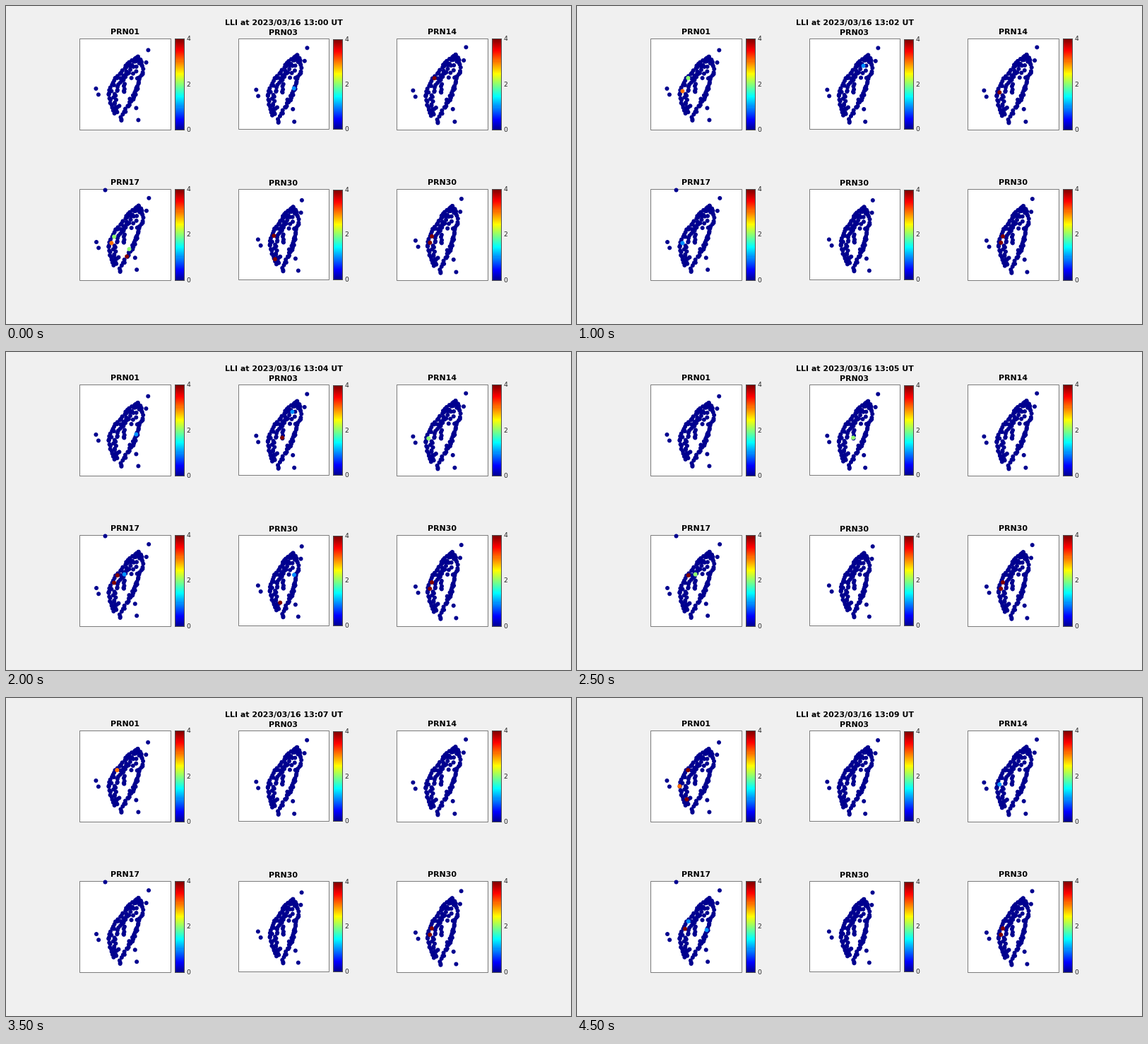
These frames come from a looping animation (800 by 450 pixels, 5000 ms). A matplotlib script:

```python
import numpy as np
import matplotlib.pyplot as plt
from matplotlib.animation import FuncAnimation
from matplotlib.colors import ListedColormap
from matplotlib.patches import Rectangle

W, H, DPI = 800, 450, 100
FRAMES, INTERVAL = 10, 500
PX = 72 / DPI
DOT = dict(s=(6 * PX) ** 2, linewidths=0, zorder=5, clip_on=False)
rng = np.random.default_rng(8)


def strand(keys, n, spread):
    """Stations spaced evenly along a polyline, scattered a little."""
    keys = np.array(keys, float)
    run = np.r_[0, np.cumsum(np.hypot(*np.diff(keys, axis=0).T))]
    t = np.linspace(0, run[-1], n)
    path = np.column_stack([np.interp(t, run, axis) for axis in keys.T])
    return path + rng.uniform(-spread, spread, path.shape)


# Island layout in the coordinates of the first panel
ANCHORS = [(201, 62), (127, 116.5), (187, 161), (163, 161.5)]
ISLETS = [(130.5, 125), (184, 144), (163, 160)]
SPOTS = {
    "west": (149, 120), "shore": (145, 124.5), "northwest": (157, 101.5),
    "bay": (152.5, 111.5), "hill": (167, 101), "north": (180, 85.5),
    "centre": (166.5, 120), "east": (184, 116), "ridge": (185.5, 102),
    "cliff": (179.5, 126), "valley": (175, 131), "cape": (172, 141),
    "south": (155, 143), "port": (151.5, 144.5), "plain": (160, 141),
}
STATIONS = np.vstack([
    list(SPOTS.values()), ANCHORS, ISLETS,
    strand([(187, 70), (174, 80), (162, 94), (151, 108), (144, 127),
            (149, 141), (153, 151)], 27, 1.3),
    strand([(187, 71), (191, 78), (194, 93), (187, 108), (182, 126),
            (172, 142), (163, 156)], 30, 1.5),
    strand([(185, 75), (171, 87), (164, 103), (156, 114), (153, 132),
            (158, 149)], 27, 2.2),
    strand([(181, 79), (173, 92), (167, 104), (166, 121)], 12, 1.5),
    strand([(197, 79), (188, 80), (183, 92), (178, 101)], 7, 1.2),
    strand([(187, 101), (185, 119), (178, 133)], 7, 1.2),
])

# title, box (x, y, size), anchor positions, level of each spot per minute
PANELS = [
    ("PRN01", (104, 46, 129),
     [(201, 62), (127, 116.5), (187, 161), (163, 161.5)],
     {"northwest": "0020002344", "west": "0030000030", "east": "0000100010",
      "cliff": "0000000040", "shore": "0000000003", "south": "0000000004"}),
    ("PRN03", (329, 46, 128),
     [(426, 59), (354, 118), (408, 163), (385, 165)],
     {"east": "1000001000", "north": "0013100000", "centre": "0002421000"}),
    ("PRN14", (553, 46, 129),
     [(651, 58), (576, 119), (635, 163), (611, 165.5)],
     {"northwest": "4000000000", "west": "0041200011"}),
    ("PRN17", (104, 259, 129),
     [(202, 271.5), (127.5, 333.5), (184.5, 372.5), (161.5, 376)],
     {"bay": "2000400024", "west": "3214002000", "valley": "2000000000",
      "cape": "4001001000", "northwest": "0000444001", "hill": "0000124000",
      "east": "0000000001"}),
    ("PRN30", (329, 259, 128),
     [(418.5, 274.5), (356.5, 330), (413.5, 374), (392, 375)],
     {"bay": "4000000030", "port": "4000001000", "plain": "0002400000",
      "west": "0000004000", "ridge": "0000100000"}),
    ("PRN30", (553, 259, 129),
     [(644.5, 272.5), (579.5, 331.5), (637, 376), (615, 377.5)],
     {"bay": "4" * FRAMES, "west": "4" * FRAMES}),
]
FAR_ISLET = (139.5, 260)


def jet64():
    i = np.arange(1, 65)
    ramps = [(i - 24, 72 - i), (i - 8, 56 - i), (i + 8, 40 - i)]
    rgb = [np.clip(np.minimum(a, b) / 16, 0, 1) for a, b in ramps]
    return ListedColormap(np.array(rgb).T)


def with_ones(p):
    return np.column_stack([p, np.ones(len(p))])


def place(targets, drift):
    """Map the island onto a panel; its north end drifts slowly."""
    goal = np.array(targets, float)
    goal[0] += np.array([-0.4, 0.5]) * drift
    fit = np.linalg.lstsq(with_ones(ANCHORS), goal, rcond=None)[0]
    return with_ones(STATIONS) @ fit


JET = jet64()
plt.rcParams["font.family"] = "DejaVu Sans"
fig = plt.figure(figsize=(W / DPI, H / DPI), dpi=DPI, facecolor="#f0f0f0")
ax = fig.add_axes([0, 0, 1, 1])
ax.axis("off")


def outline(x, y, w, h, face, edge, z):
    ax.add_patch(Rectangle((x + 0.5, y + 0.5), w, h, fc=face, ec=edge,
                           lw=PX, zorder=z, snap=False))


def heading(x, y, text):
    return ax.text(x, y, text, fontsize=11 * PX, weight="bold", ha="center",
                   va="baseline", color="black", zorder=6)


def draw_panel(title, x, y, size):
    inset = 129 - size
    outline(x, y, size, size, "white", "#7c7c7c", 1)
    heading(x + size / 2 - 0.3, y - 6 + inset, title)
    bar_x, bar_y = x + 135 - inset, y + inset
    bar_h = size - inset
    ax.imshow(np.arange(64)[:, None], cmap=JET, aspect="auto", origin="lower",
              extent=(bar_x, bar_x + 14, bar_y + bar_h + 1, bar_y),
              interpolation="nearest", zorder=2)
    outline(bar_x, bar_y, 13, bar_h, "none", "#505050", 3)
    for level in (0, 2, 4):
        ax.text(bar_x + 16.7, bar_y + bar_h * (1 - level / 4) + 0.5,
                str(level), fontsize=9.3 * PX, color="#262626",
                ha="left", va="center", zorder=6)


clouds = []
for title, box, targets, flags in PANELS:
    draw_panel(title, *box)
    clouds.append(ax.scatter([], [], **DOT))
ax.scatter(*FAR_ISLET, color=[JET(0)], **DOT)
clock = heading(393.5, 27, "")
ax.set_xlim(0, W)
ax.set_ylim(H, 0)


def update(k):
    clock.set_text(f"LLI at 2023/03/16 13:{k:02d} UT")
    for cloud, (title, box, targets, flags) in zip(clouds, PANELS):
        pts = place(targets, k / (FRAMES - 1)) + 0.4
        levels = np.zeros(len(pts))
        for i, spot in enumerate(SPOTS):
            levels[i] = int(flags.get(spot, "0" * FRAMES)[k])
        order = np.argsort(levels, kind="stable")
        cloud.set_offsets(pts[order])
        cloud.set_facecolors(JET(levels[order] / 4))
    return clouds + [clock]


anim = FuncAnimation(fig, update, frames=FRAMES, interval=INTERVAL,
                     repeat=True, repeat_delay=0)
plt.show()
```
